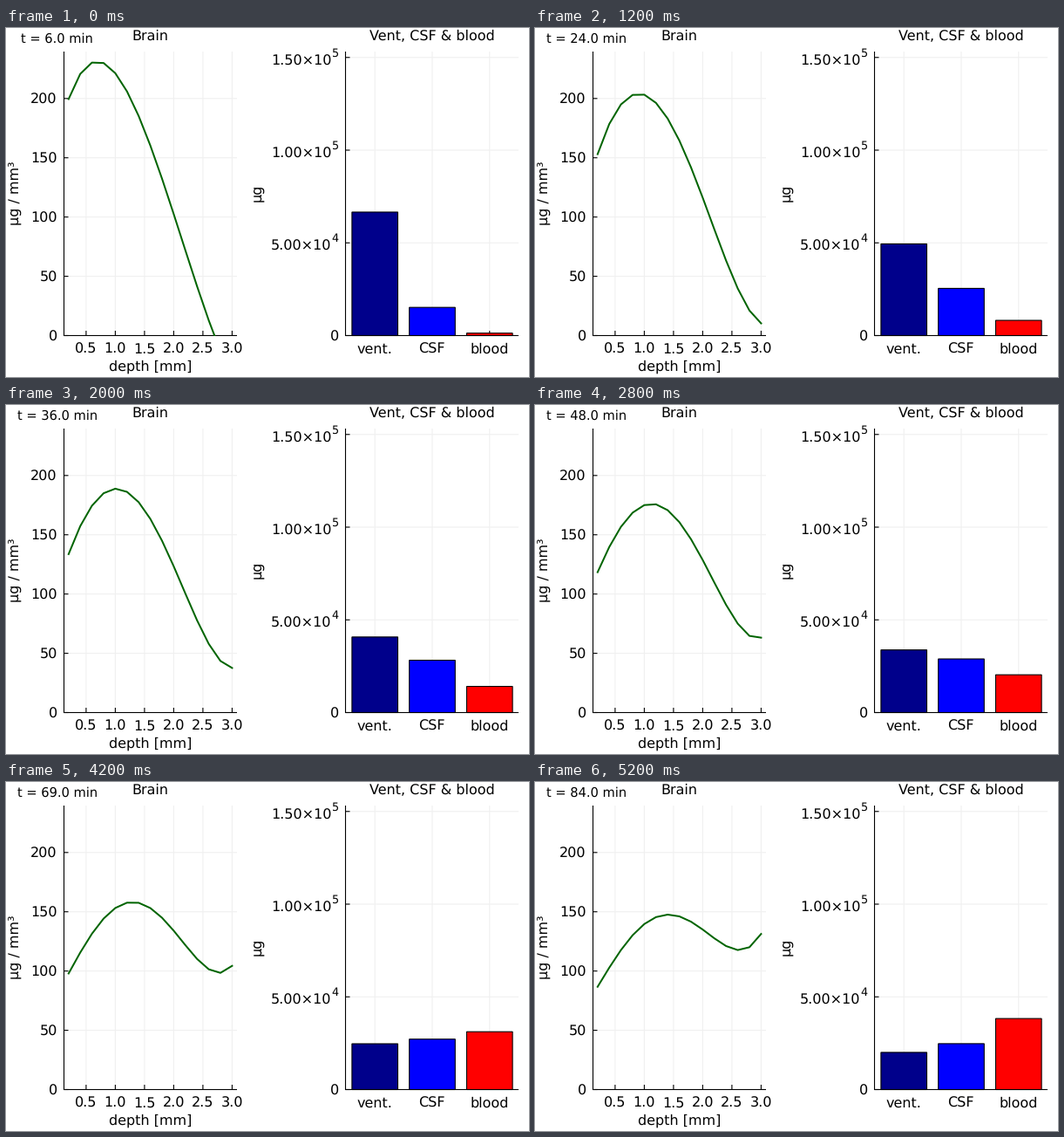
Animation, 600 px wide and 400 px high, one loop 5.4 s. Source, as a matplotlib script:

```python
import numpy as np
import matplotlib.pyplot as plt
from matplotlib.animation import FuncAnimation
from matplotlib.patches import Rectangle

plt.rcParams.update({"font.family": "DejaVu Sans", "text.hinting": "none"})

W, H, DPI = 600, 400, 100
PT = 72 / DPI  # points per pixel
TOP, BASE = 27, 352.5
FRAMES, STEP = 27, 200

# Brain concentration at a few depths (mm) and times (min)
KEY_DEPTHS = [0.2, 0.6, 1.2, 2.0, 2.6, 3.0]
KEY_TIMES = [6, 24, 48, 84]
KEY_LEVELS = np.array([
    [199.5, 230.3, 206, 102.5, 12.8, -35],
    [153, 195, 196.3, 116.3, 39.7, 10.3],
    [118.4, 156.7, 175.7, 128.7, 75, 63.2],
    [86.7, 117.7, 145.5, 135, 117.7, 131.3],
])
DEPTHS = 0.2 * np.arange(1, 16)


def poly_through(knots, values, points):
    """Evaluate the polynomial through (knots, values) at points."""
    coef = np.linalg.solve(np.vander(knots), values)
    return np.vander(np.atleast_1d(points), len(knots)) @ coef


PROFILES = poly_through(KEY_DEPTHS, KEY_LEVELS.T, DEPTHS).T


def brain(t):
    # Diffusion runs smoothly in the square root of time
    return poly_through(np.sqrt(KEY_TIMES), PROFILES, np.sqrt(t))[0]


def pools(t):
    """Ventricle drains to CSF and CSF to blood at one rate; the sum is kept."""
    rate, total = 0.0182, 83.1
    tau = t - 6
    decay = np.exp(-rate * tau)
    vent = 5.2 + 61.4 * decay
    csf = (15.2 + 61.4 * rate * tau) * decay
    return vent, csf, total - vent - csf


def depth_x(d):
    return 58.4 + 67 * d


def brain_y(c):
    return BASE - 1.3585 * c


def pool_y(k):
    return BASE - 2.125 * k


fig = plt.figure(figsize=(W / DPI, H / DPI), dpi=DPI, facecolor="white")
ax = fig.add_axes([0, 0, 1, 1])
ax.set(xlim=(0, W), ylim=(H, 0))
ax.axis("off")


def text(x, y, s, size=16, ha="center"):
    return ax.text(x, y, s, fontsize=size * PT, ha=ha, va="baseline")


def side_label(x, s):
    ax.text(x, 189.2, s, fontsize=16 * PT, rotation=90, ha="right", va="center")


def rule(x0, y0, x1, y1, color="black", z=2):
    ax.plot([x0, x1], [y0, y1], color=color, lw=1.1 * PT, zorder=z,
            solid_capstyle="butt", snap=False)


def panel(left, right, xs, ys, title):
    """Grid, inward ticks, axis lines and title."""
    for x in xs:
        rule(x, TOP, x, BASE, "#f0f0f0", 1)
        rule(x, BASE, x, BASE - 5.5)
    for y in ys:
        rule(left, y, right, y, "#f0f0f0", 1)
        rule(left, y, left + 5, y)
    rule(left, TOP, left, BASE + 0.5)
    rule(left - 0.5, BASE, right, BASE)
    text((left + right) / 2, 13.9, title)


# Brain panel
ticks = np.arange(0.5, 3.1, 0.5)
levels = np.arange(0, 201, 50)
panel(66.5, 265, depth_x(ticks), brain_y(levels), "Brain")
for d in ticks:
    text(depth_x(d), 372.4, f"{d:.1f}")
for c in levels:
    text(58.7, brain_y(c) + 6.1, str(c), ha="right")
text(165.8, 393, "depth [mm]")
side_label(19.5, "μg / mm³")

# Compartment panel
centers = 489 + 65.8 * np.arange(-1, 2)
amounts = np.arange(0, 151, 50)
panel(389.5, 588, centers, pool_y(amounts), "Vent, CSF & blood")
for x, name in zip(centers, ["vent.", "CSF", "blood"]):
    text(x - 0.3, 372.4, name)
text(381.7, BASE + 6.1, "0", ha="right")
for k in amounts[1:]:
    mantissa, power = f"{k * 1000:.2e}".split("e+0")
    y = pool_y(k) + 8.7
    text(373.6, y, f"{mantissa}×10", ha="right")
    text(381.2, y - 10, power, size=12.8, ha="right")
side_label(296.5, "μg")

# Moving parts
clock = text(58.7, 16.7, "", size=14.67)
curve, = ax.plot([], [], color="#006400", lw=2 * PT, zorder=3)
curve.set_clip_path(Rectangle((66, TOP), 199.5, BASE - TOP, transform=ax.transData))
bars = [
    ax.add_patch(Rectangle((x - 26.3, BASE), 52.6, 0, fc=color, ec="black",
                           lw=1.1 * PT, zorder=3, snap=False))
    for x, color in zip(centers, ["#00008b", "#0000ff", "#ff0000"])
]


def draw(i):
    t = 6 + 3 * i
    clock.set_text(f"t = {t:.1f} min")
    curve.set_data(depth_x(DEPTHS), brain_y(brain(t)))
    for bar, k in zip(bars, pools(t)):
        bar.set_height(pool_y(k) - BASE)
    return [clock, curve, *bars]


anim = FuncAnimation(fig, draw, frames=FRAMES, interval=STEP, repeat=True,
                     repeat_delay=0, blit=False)
plt.show()
```
